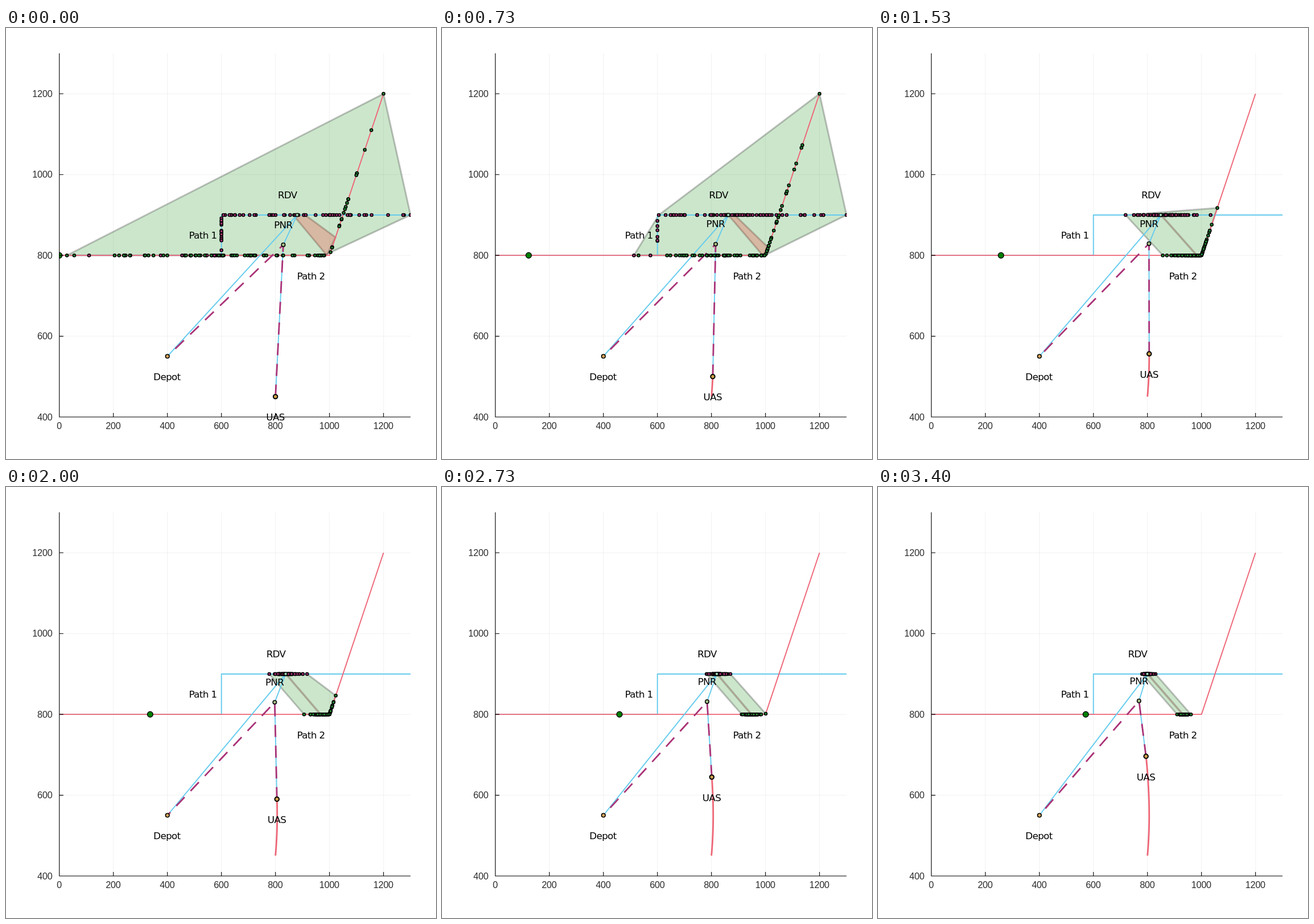
An HTML page for the animation above (3.47 s loop, 748 by 749 pixels).

```html
<!DOCTYPE html>
<html lang="en">
<head>
<meta charset="utf-8">
<title>Rendezvous planning</title>
<style>
  html, body { margin: 0; width: 100%; height: 100%; overflow: hidden; background: #fff; }
  svg { display: block; width: 748px; height: 749px; }
  .line { fill: none; stroke-linejoin: round; }
  .label { font: 16.5px "DejaVu Sans", sans-serif; letter-spacing: -0.6px; text-anchor: middle; }
  .tick { font: 16px "Liberation Sans", Arial, sans-serif; letter-spacing: -0.2px; fill: #2b2b2b; }
</style>
</head>
<body>
<svg id="stage" viewBox="0 0 748 749"></svg>
<script>
const LOOP = 3470, COUNT = 80;
const RED = '#ee6677', CYAN = '#66ccee', PURPLE = '#aa3377', GREEN = '#228833';
const PATH1 = [[0, 800], [600, 800], [600, 900], [1300, 900]];
const PATH2 = [[0, 800], [1000, 800], [1200, 1200]];
const DEPOT = [280.8, 570.5];

// step, path 1 low/high, path 2 low/high, rendezvous x, core left/right, core low/high
const KEYS = [
  [0, 110, 1750, 28, 1800, 506.5, -7, 14, 990, 1050],
  [5, 192, 1650, 200, 1650, 503.5, 0, 9, 1000, 1024],
  [11, 513, 1450, 530, 1460, 498, 0, 11, 990, 1022],
  [17, 753, 1276, 777, 1318, 496.5, 0, 1.5, 993, 997],
  [24, 830, 1110, 870, 1100, 491, 0, 1, 980, 982],
  [30, 877, 1017, 906, 1052, 486.5, 0, 1, 966, 968],
  [41, 882, 970, 912, 1002, 478, 0, 1, 947, 949],
  [51, 880, 930, 910, 961, 468.5, 0, 1, 930, 932]
];

const stage = document.getElementById('stage');
const px = x => 92.8 + x * 0.46992;
const py = y => 676 - (y - 400) * 0.7021;
const toPx = ([x, y]) => [px(x), py(y)];

function add(tag, attrs, parent = stage) {
  const el = document.createElementNS('http://www.w3.org/2000/svg', tag);
  for (const k in attrs) el.setAttribute(k, attrs[k]);
  parent.appendChild(el);
  return el;
}
function text(str, x, y, cls, anchor) {
  const el = add('text', { x, y, class: cls });
  if (anchor) el.style.textAnchor = anchor;
  el.textContent = str;
  return el;
}
const join = pts => pts.map(p => p[0].toFixed(2) + ',' + p[1].toFixed(2)).join(' ');
const setPts = (el, pts) => el.setAttribute('points', join(pts));
function move(el, [x, y]) {
  el.setAttribute('cx', x.toFixed(2));
  el.setAttribute('cy', y.toFixed(2));
}
function place(el, x, y) {
  el.setAttribute('x', x.toFixed(2));
  el.setAttribute('y', y.toFixed(2));
}

// Static scenery
const clip = add('clipPath', { id: 'plot' }, add('defs', {}));
add('rect', { x: 92, y: 44, width: 612, height: 632.5 }, clip);
for (let x = 0; x <= 1200; x += 200) {
  add('path', { d: `M${px(x)} 44V676`, stroke: '#000', 'stroke-opacity': 0.06 });
  text(x, px(x) - 0.3, 696.7, 'tick', 'middle');
}
for (let y = 400; y <= 1200; y += 200) {
  add('path', { d: `M92.8 ${py(y)}H703.7`, stroke: '#000', 'stroke-opacity': 0.06 });
  text(y, 80.6, py(y) + 5.7, 'tick', 'end');
}
let axes = 'M92.8 44V676H703.7';
for (let v = 200; v <= 1200; v += 200) {
  axes += `M${px(v)} 676v-7`;
  if (v > 200) axes += `M92.8 ${py(v)}h7`;
}

const plot = add('g', { 'clip-path': 'url(#plot)' });
const line = (color, width, extra) =>
  add('polyline', { class: 'line', stroke: color, 'stroke-width': width, ...extra }, plot);
const area = (fill, stroke) => add('polygon', {
  fill, 'fill-opacity': 0.2, stroke, 'stroke-opacity': 0.23,
  'stroke-width': 3, 'stroke-linejoin': 'round'
}, plot);
const dot = (fill, r, width) =>
  add('circle', { r, fill, stroke: '#000', 'stroke-width': width }, plot);
const dots = fill => Array.from({ length: COUNT }, () => dot(fill, 2.5, 1.5));

const hullArea = area('#008000', '#000');
const coreArea = area('#ff0000', '#300a00');
setPts(line(CYAN, 1.9), PATH1.map(toPx));
setPts(line(RED, 1.9), PATH2.map(toPx));
const trail = line(RED, 2.8);
const route = line(CYAN, 1.9);
const dash = line(PURPLE, 2.8, { 'stroke-dasharray': '21 15' });
const dots1 = dots(PURPLE);
const dots2 = dots(GREEN);
const target = dot('#008000', 4.8, 1.5);
const rdvDot = dot('#9fd3b5', 2.8, 1.4);
const pnrDot = dot('#a9c08a', 3.2, 1.5);
move(dot('#dba75c', 3.3, 1.6), DEPOT);
const uasDot = dot('#cfa24c', 3.7, 2);
add('path', { d: axes, class: 'line', stroke: '#000', 'stroke-width': 1.1 });

text('Depot', 280, 612, 'label');
text('Path 1', 342.4, 366.3, 'label');
text('Path 2', 530.4, 436.5, 'label');
const rdvText = text('RDV', 0, 0, 'label');
const pnrText = text('PNR', 0, 0, 'label');
const uasText = text('UAS', 0, 0, 'label');

function random(seed) {
  return () => {
    seed = (seed + 0x6D2B79F5) | 0;
    let t = Math.imul(seed ^ (seed >>> 15), 1 | seed);
    t = (t + Math.imul(t ^ (t >>> 7), 61 | t)) ^ t;
    return ((t ^ (t >>> 14)) >>> 0) / 4294967296;
  };
}

// Point at distance s along a path, held at its end
function along(path, s) {
  for (let i = 1; i < path.length; i++) {
    const [a, b] = [path[i - 1], path[i]];
    const len = Math.hypot(b[0] - a[0], b[1] - a[1]);
    if (s <= len) {
      const k = s / len;
      return toPx([a[0] + (b[0] - a[0]) * k, a[1] + (b[1] - a[1]) * k]);
    }
    s -= len;
  }
  return toPx(path[path.length - 1]);
}

// Bell-shaped spread between two fixed extremes
function sample(path, lo, hi, rnd) {
  return Array.from({ length: COUNT }, (_, i) => {
    const u = i < 2 ? i : ((rnd() + rnd() + rnd()) / 3) ** 1.15;
    return along(path, lo + (hi - lo) * u);
  });
}

function hull(pts) {
  const sorted = [...pts].sort((a, b) => a[0] - b[0] || a[1] - b[1]);
  const half = list => {
    const out = [];
    for (const p of list) {
      while (out.length > 1) {
        const [a, b] = out.slice(-2);
        const turn = (b[0] - a[0]) * (p[1] - a[1]) - (b[1] - a[1]) * (p[0] - a[0]);
        if (turn > 0) break;
        out.pop();
      }
      out.push(p);
    }
    return out.slice(0, -1);
  };
  return [...half(sorted), ...half(sorted.reverse())];
}

function state(n) {
  const i = Math.max(1, KEYS.findIndex(k => k[0] >= n));
  const [a, b] = [KEYS[i - 1], KEYS[i]];
  const k = (n - a[0]) / (b[0] - a[0]);
  return a.map((v, j) => v + (b[j] - v) * k);
}

const uasAt = n => [468.7 + 0.2805 * n - 0.00646 * n * n, 640.6 - 3.107 * n - 0.00543 * n * n];

function draw(n) {
  const [, lo1, hi1, lo2, hi2, rx, left, right, coreLo, coreHi] = state(n);
  const rnd = random(n * 977 + 11);
  const set1 = sample(PATH1, lo1, hi1, rnd);
  const set2 = sample(PATH2, lo2, hi2, rnd);
  set1.forEach((p, i) => move(dots1[i], p));
  set2.forEach((p, i) => move(dots2[i], p));
  setPts(hullArea, hull([...set1, ...set2]));

  const ry = py(900);
  setPts(coreArea, [[rx + left, ry], [rx + right, ry], along(PATH2, coreHi), along(PATH2, coreLo)]);

  const rdv = [rx, ry];
  const pnr = [454 + 0.747 * (rx - 468.5), 371.8 + 0.129 * (rx - 468.5)];
  const uas = uasAt(n);
  setPts(trail, Array.from({ length: n + 1 }, (_, i) => uasAt(i)));
  setPts(route, [uas, pnr, rdv, DEPOT]);
  setPts(dash, [uas, pnr, DEPOT]);
  move(target, [92.8 + 5.266 * n, py(800)]);
  move(rdvDot, rdv);
  move(pnrDot, pnr);
  move(uasDot, uas);
  place(rdvText, rx - 16.9, 296);
  place(pnrText, pnr[0] - 0.2, pnr[1] - 29.2);
  place(uasText, uas[0] - 0.2, uas[1] + 41.5);
}

let start = null, shown = -1;
function tick(now) {
  if (start === null) start = now;
  const t = Math.max(0, now - start) % LOOP;
  // Fifteen steps a second, on a grid of 10 ms
  const n = Math.min(51, Math.floor((Math.floor(t / 10) * 3 + 1) / 20));
  if (n !== shown) draw(shown = n);
  requestAnimationFrame(tick);
}
draw(0);
requestAnimationFrame(tick);
</script>
</body>
</html>
```
